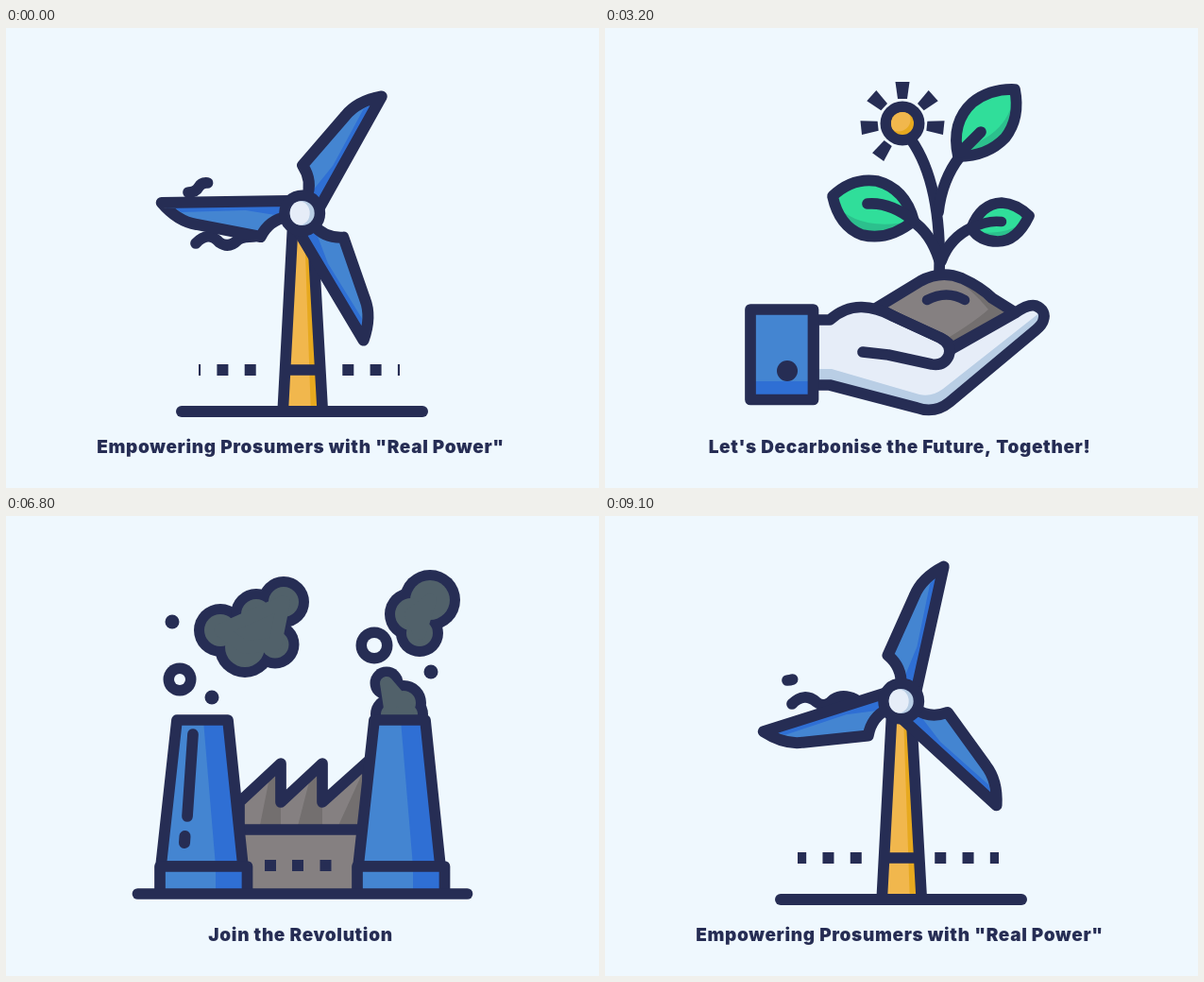
An HTML page with a canvas for the animation above (9200 ms loop, 628 by 487 pixels).

```html
<!DOCTYPE html>
<html lang="en">
<head>
<meta charset="utf-8">
<title>Clean energy loop</title>
<style>
html, body { margin: 0; width: 100%; height: 100%; overflow: hidden; background: #eff8fe; }
canvas { display: block; }
</style>
</head>
<body>
<canvas id="stage" width="628" height="487"></canvas>
<script>
const c = document.getElementById('stage').getContext('2d');
const BG = '#eff8fe', NAVY = '#262d54', BLUE = '#4485d1', DEEP = '#2f6fd4', BAND = '#b9cee5',
  PALE = '#e6edf8', GOLD = '#f1b74d', AMBER = '#e7a91f', GREEN = '#30de9a', MOSS = '#2cc08d',
  GREY = '#858081', ASH = '#736f6f', SMOKE = '#51616a';
const LOOP = 9.2, SCENE = LOOP / 3, CUT = 1.1;

const clamp = x => Math.max(0, Math.min(1, x));
const ease = x => 1 - (1 - clamp(x)) ** 3;

function group(fn) { c.save(); fn(); c.restore(); }

function clipRect(x, y, w, h) { c.beginPath(); c.rect(x, y, w, h); c.clip(); }

function fill(d, color) { c.fillStyle = color; c.fill(new Path2D(d)); }

function line(d, w = 11.7) { c.lineWidth = w; c.strokeStyle = NAVY; c.stroke(new Path2D(d)); }

// Filled shape with a shaded part inside and an outline
function shape(d, color, shade, dark, w) {
  fill(d, color);
  if (shade) group(() => { c.clip(new Path2D(d)); fill(shade, dark); });
  line(d, w);
}

// Part of a line between two lengths
function trim(d, from, to, w) {
  if (to <= from) return;
  group(() => { c.setLineDash([0, from, to - from, 999]); line(d, w); });
}

function dot(x, y, r, color = NAVY) {
  c.fillStyle = color;
  c.beginPath();
  c.arc(x, y, Math.max(0, r), 0, 7);
  c.fill();
}

function ring(x, y, r, hole) { dot(x, y, r); dot(x, y, hole, BG); }

// Merged circles with one outline; the centres span the inside
function blob(circles) {
  for (const [x, y, r] of circles) dot(x, y, r);
  for (const [x, y, r] of circles) dot(x, y, r - 11, SMOKE);
  c.lineWidth = 14;
  c.strokeStyle = SMOKE;
  c.beginPath();
  for (const [x, y] of circles) c.lineTo(x, y);
  c.closePath();
  c.fill();
  c.stroke();
}

function grow(x, y, k, fn) {
  if (k > 0) group(() => { c.translate(x, y); c.scale(k, k); c.translate(-x, -y); fn(); });
}

function ground(x, y, half, l, w) {
  const h = half * ease(l / .7);
  if (h > 0) line(`M${x - h} ${y}H${x + h}`, w);
}

function sun() {
  for (const a of [-90, -42, 6, 126, 174, 222]) group(() => {
    c.translate(315, 101);
    c.rotate(a * Math.PI / 180);
    fill('M26 -5L44 -7.5V7.5L26 5Z', NAVY);
  });
  dot(315, 101, 23.5);
  dot(315, 101, 12, AMBER);
  group(() => {
    c.beginPath(); c.arc(315, 101, 12, 0, 7); c.clip();
    dot(311, 97, 12.5, GOLD);
  });
}

function plant(l) {
  line('M354 260Q357 165 324 118');
  line('M353 195Q357 160 376 136');
  line('M354 246Q345 217 325 204');
  line('M356 247Q365 222 389 211');
  grow(374, 136, ease((l - .9) / .6), () => {
    shape('M374 136Q366 100 389 79Q408 64 434 65Q440 95 424 116Q405 136 374 136Z', GREEN,
      'M434 65Q430 114 374 128V140H445V65Z', MOSS);
    line('M376 132L398 110');
  });
  grow(327, 204, ease((l - .8) / .6), () => {
    shape('M241 178Q262 158 288 162Q318 170 327 204Q300 226 272 219Q248 210 241 178Z', GREEN,
      'M241 184Q268 217 327 204V230H241Z', MOSS);
    line('M278 186Q302 184 327 204');
  });
  grow(388, 212, ease((l - .85) / .6), () => {
    shape('M388 212Q398 186 420 185Q436 186 449 199Q436 226 416 226Q397 226 388 212Z', GREEN,
      'M449 199Q430 222 388 215V230H450Z', MOSS);
    line('M388 212Q405 203 420 205', 10.5);
  });
  grow(324, 118, ease((l - 1) / .5), sun);
}

function hand(l) {
  grow(310, 400, ease((l - .05) / .9), () => {
    grow(354, 262, ease((l - .4) / .8), () => plant(l));
    shape('M288 296L334 268Q356 256 378 265Q398 274 410 286L434 301L368 338Z', GREY,
      'M366 262Q388 276 406 298Q390 312 360 330V345L440 302V262Z', ASH);
    line('M341 288Q362 277 381 288', 10.5);
    shape('M221 309H238Q254 295 272 295.5Q288 296 305 305L355 328Q366 333 367 340L434 302Q448 292 456 294Q468 299 464 310Q463 314 456 320L365 396Q349 409 330 402L238 378H221Z',
      PALE, 'M221 361H240L333 388Q346 391 358 382L466 297V410H221Z', BAND);
    line('M305 305L355 328Q368 335 364 347Q359 358 346 356L300 346L273 343');
    shape('M154 298H220.5V393.5H154Z', BLUE, 'M150 374H225V400H150Z', DEEP);
    dot(193, 363, 11);
  });
}

function smoke(l) {
  const drift = (2.633 - l) * 8;
  const puff = (x, y, start, fn) => group(() => {
    c.translate(0, drift);
    grow(x, y, ease((l - start) / 1.2), fn);
  });
  puff(262, 150, .6, () => blob([[227, 121, 28], [253, 139, 32], [285, 136, 25.5], [294, 91, 27], [265, 104, 27]]));
  puff(438, 130, .7, () => blob([[449, 89, 32], [429, 104, 28], [438, 124, 25]]));
  puff(184, 173, .5, () => ring(184, 173, 17.5, 6));
  puff(390, 137, .6, () => ring(390, 137, 19.5, 8));
  puff(176, 112, .7, () => dot(176, 112, 7.5));
  puff(450, 165, .6, () => dot(450, 165, 7.5));
  grow(417, 214, ease((l - .6) / .8), () =>
    blob([[403, 177, 17.5], [421, 198, 24], [425, 210, 22], [408, 210, 22]]));
  const k = ease((l - .22) / .8);
  dot(213 + 5 * k, 197 - 5 * k, .8 + 6.7 * k);
}

function chimney(x, y, drop) {
  const dark = drop > 20 ? BLUE : DEEP;
  group(() => {
    c.translate(x, y);
    shape(`M181 ${216 + drop}H235L251 371H164Z`, BLUE, 'M209 216L222 371H260V200H209Z', dark);
    shape('M163 371H255.5V402H163Z', BLUE, 'M222 371H260V402H222Z', dark);
  });
}

function factory(l) {
  const rest = 1 - ease(l / .7);
  const dx = Math.min(104, 273 * rest), dy = 50 * rest, drop = Math.min(150, 213 * rest);
  smoke(l);
  group(() => {
    clipRect(0, 0, 628, 401);
    group(() => {
      c.translate(0, 150 * (1 - ease((l - .45) / .5)));
      shape('M247 303L291 262V303L335 262V303L383 260V402H247Z', GREY,
        'M282 262L268 332H291V262ZM326 262L308 332H335V262ZM383 260L350 332H383Z', ASH);
      line('M250 332H378');
      c.fillStyle = NAVY;
      for (const x of [274, 303, 332.5]) c.fillRect(x, 364, 12, 12);
    });
    if (l > .06) {
      chimney(dx, dy, drop);
      group(() => {
        c.translate(dx, dy);
        line('M189.5 339L189 346', 12);
        trim('M192 318L198 231', 0, 88 * ease((l - .4) / .4), 11.7);
      });
      chimney(209 - dx, dy, drop);
    }
  });
  ground(314, 400, 174.5, l);
}

function blade(reach) {
  const d = 'M-12 -13L-149 -11Q-132 9 -112 12L-44 25Q-35 7 -16 4Z';
  group(() => {
    c.beginPath(); c.arc(0, 0, reach, 0, 7); c.clip();
    shape(d, BLUE, 'M0 -16H-152L-128 -1L-60 -3L-16 4Z', DEEP, 12);
    c.clip(new Path2D(d));
    c.beginPath(); c.arc(0, 0, Math.max(0, reach - 5.5), 0, 7);
    c.stroke();
  });
}

function sideDots(s) {
  const low = Math.max(204, 271 - 70.6 * s), gap = 29.3;
  const shift = (((253.5 - 70.6 * (s - 1.5)) % gap) + gap) % gap;
  c.fillStyle = NAVY;
  for (let x = 175 + shift; x < 280; x += gap) {
    const a = Math.max(x, low), b = Math.min(x + 12, 280);
    if (b > a) {
      c.fillRect(a, 356, b - a, 12);
      c.fillRect(621 - b, 356, b - a, 12);
    }
  }
}

function wind(s) {
  const gust = (d, start, speed, end) => trim(d, Math.max(0, (s - end) * 170), Math.min(90, (s - start) * speed));
  gust('M193 174Q201 174 204 168.500T214 164Q222 164 228 168', 1.37, 185, 2.1);
  gust('M198 199Q211 186 224 197Q233 204 242 194Q252 188 265 194', .7, 170, 1.8);
  gust('M201 228Q214 214 226 227Q236 234 246 224Q252 221 262 221', .8, 170, 1.9);
}

function turbine(l) {
  const s = l - .4667;
  const rise = ease((l - .05) / .55), lift = 205 * (1 - rise);
  const spin = s < 1.5 ? 103 * s + 22.1 * s * s - 204.2 : 165 * (s - 1.5);
  wind(s);
  group(() => {
    clipRect(0, 0, 628, 406);
    c.translate(0, lift);
    const top = 406 - 195 * ease((s - .03) / .35);
    group(() => {
      clipRect(280, top, 70, 406 - top);
      fill('M303 211H325L336 410H292Z', GOLD);
      fill('M316 211H325L336 410H323Z', AMBER);
    });
    line('M303.500 213L293 410M324.500 213L335.500 410M297 362H332');
  });
  if (s > -.2) sideDots(s);
  ground(313.5, 406, 127.5, l, 12);
  group(() => {
    c.translate(313.7, 196 + lift);
    const reach = Math.min(170, 43 + 330 * s);
    if (reach > 0) for (let i = 0; i < 3; i++) group(() => {
      c.rotate((spin + i * 120) * Math.PI / 180);
      blade(reach);
    });
    const k = clamp((s + .25) / .2);
    dot(0, 0, 24.5 * k);
    dot(0, 0, 13 * k, s > .1 ? BAND : PALE);
    c.fillStyle = PALE;
    c.beginPath(); c.ellipse(-2.5 * k, 0, 10.5 * k, 12.5 * k, 0, 0, 7); c.fill();
  });
}

function caption(text, l) {
  c.globalAlpha = clamp((l - .55) / .2);
  c.fillStyle = NAVY;
  c.font = '900 19px Inter, "Liberation Sans", sans-serif';
  c.letterSpacing = '0.65px';
  c.textAlign = 'center';
  c.fillText(text, 312, 449.5);
  c.globalAlpha = 1;
}

// Diagonal band that sweeps from bottom left to top right
function wipe(u) {
  const lead = 539 + u * (u < 0 ? 2280 : 2575), tail = lead - 607;
  if (lead < -446 || tail > 575) return;
  group(() => {
    clipRect(12, 37, 600, 421);
    fill(`M${tail + 37} 37H${lead + 37}L${lead + 458} 458H${tail + 458}Z`, BAND);
  });
}

const scenes = [
  [hand, "Let's Decarbonise the Future, Together!"],
  [factory, 'Join the Revolution'],
  [turbine, 'Empowering Prosumers with "Real Power"']
];

function draw(t) {
  const pos = (t - CUT + LOOP) % LOOP + 1e-6;
  const i = Math.floor(pos / SCENE) % 3, l = pos % SCENE;
  const [paint, text] = scenes[i];
  c.fillStyle = BG;
  c.fillRect(0, 0, 628, 487);
  c.lineCap = c.lineJoin = 'round';
  paint(l);
  caption(text, l);
  wipe(l < 1 ? l : l - SCENE);
}

const start = performance.now();
function tick() {
  const ms = Math.max(0, performance.now() - start);
  draw(Math.floor(ms / 100) / 10 % LOOP);
  requestAnimationFrame(tick);
}
tick();
</script>
</body>
</html>
```
